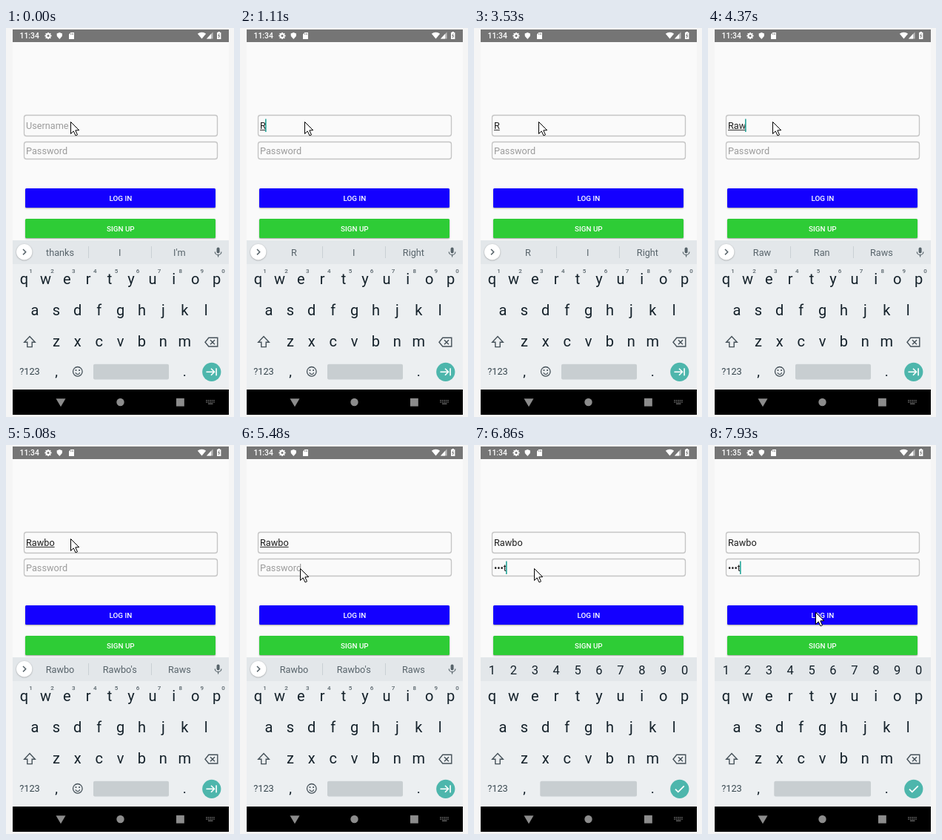
These frames come from a looping animation (308 by 524 pixels, 8 s). An HTML page with a canvas:

```html
<!DOCTYPE html>
<html lang="en">
<head>
<meta charset="utf-8">
<title>Log in</title>
<style>
html, body { margin: 0; width: 100%; height: 100%; overflow: hidden; background: #f5f5f5; }
canvas { display: block; width: 308px; height: 524px; }
</style>
</head>
<body>
<canvas id="stage"></canvas>
<script>
const LOOP = 8000, W = 308, H = 524, TAU = Math.PI * 2;
const canvas = document.getElementById('stage');
const c = canvas.getContext('2d');
const dpr = window.devicePixelRatio || 1;
canvas.width = W * dpr;
canvas.height = H * dpr;

const INK = '#14212a', SOFT = '#58646b', ICON = '#455159', TEAL = '#4db6ac';
const BAR = '#757575', NAV = '#8c8c8c', WHITE = '#fff';
const DIGITS = '1234567890', KEY_W = 28.9;

const NAME = 'Rawbo', SECRET = 'test';
const nameKeys = [1110, 3940, 4370, 4520, 4520];
const secretKeys = [6460, 6460, 6710, 6860];
const FIRST_BLINK = 130, FOCUS = 5600, KEYS_SWAP = 5750, MINUTE = 7260;
const BLINK = 484;
const caretResets = [FIRST_BLINK, ...nameKeys, FOCUS, ...secretKeys];

// Suggestions beside the typed word, by its length
const sideWords = ['I I\'m', 'I Right', 'Ran Rare', 'Ran Raws', '', NAME + '\'s Raws'];

const typed = (keys, t) => keys.filter(k => t >= k).length;

function caretOn(t) {
  const last = caretResets.filter(k => t >= k).pop();
  return last !== undefined && Math.floor((t - last) / BLINK) % 2 === 0;
}

// Three eased jumps, 130 ms apart
function glide(t, start) {
  const step = Math.floor((t - start) / 130) + 1;
  return Math.sin(Math.min(3, Math.max(0, step)) / 3 * Math.PI / 2);
}

function mousePos(t) {
  const a = glide(t, 5200), b = glide(t, 7540);
  return [87 - 6 * a + 64 * b, 126 + 40 * a + 59 * b].map(Math.round);
}

function rect(x, y, w, h, color) {
  c.fillStyle = color;
  c.fillRect(x, y, w, h);
}

function fill(color) {
  c.fillStyle = color;
  c.fill();
}

function stroke(color, width) {
  c.strokeStyle = color;
  c.lineWidth = width;
  c.stroke();
}

function round(x, y, w, h, r) {
  c.beginPath();
  c.moveTo(x + r, y);
  c.arcTo(x + w, y, x + w, y + h, r);
  c.arcTo(x + w, y + h, x, y + h, r);
  c.arcTo(x, y + h, x, y, r);
  c.arcTo(x, y, x + w, y, r);
  c.closePath();
}

function arc(x, y, r, from = 0, to = TAU) {
  c.beginPath();
  c.arc(x, y, r, from, to);
}

function disc(x, y, r, color) {
  arc(x, y, r);
  fill(color);
}

function path(points, close) {
  c.beginPath();
  points.forEach(([x, y], i) => i ? c.lineTo(x, y) : c.moveTo(x, y));
  if (close) c.closePath();
}

function poly(points, color) {
  path(points, true);
  fill(color);
}

function line(points, color, width, close) {
  path(points, close);
  stroke(color, width);
}

// Symmetric outline around x from its right half
function mirror(x, y, half) {
  const right = half.map(([dx, dy]) => [x + dx, y + dy]);
  const left = half.map(([dx, dy]) => [x - dx, y + dy]).reverse();
  return [...right, ...left];
}

// Arrow head pointing right
function chevron(x, y, r, color, width) {
  line([[x - r, y - r], [x, y], [x - r, y + r]], color, width);
}

function text(s, x, y, size, color, align = 'center', weight = 400) {
  c.font = `${weight} ${size}px Roboto, "Noto Sans", sans-serif`;
  c.textAlign = align;
  c.fillStyle = color;
  c.fillText(s, x, y);
}

function withShadow(blur, dy, draw) {
  c.save();
  c.shadowColor = 'rgba(0,0,0,.35)';
  c.shadowBlur = blur * dpr;
  c.shadowOffsetY = dy * dpr;
  draw();
  c.restore();
}

function statusBar(t) {
  rect(9, 2, 292, 17, BAR);
  text(t < MINUTE ? '11:34' : '11:35', 18.5, 14.2, 10.4, WHITE, 'left', 500);

  // gear
  for (let a = 0; a < Math.PI; a += Math.PI / 4) {
    const dx = Math.cos(a) * 4.6, dy = Math.sin(a) * 4.6;
    line([[57 - dx, 10.5 - dy], [57 + dx, 10.5 + dy]], WHITE, 1.7);
  }
  disc(57, 10.5, 3.5, WHITE);
  disc(57, 10.5, 1.5, BAR);

  // shield and memory card
  poly(mirror(72.3, 6, [[0, 0], [3.7, 1.5], [3.5, 5], [0, 9]]), WHITE);
  poly([[87.5, 6], [92, 6], [92, 15], [85, 15], [85, 8.5]], WHITE);
  for (let i = 0; i < 3; i++) rect(87.3 + i * 1.5, 7.2, .7, 1.9, BAR);

  // wifi, signal and battery
  c.beginPath();
  c.moveTo(264.5, 14.5);
  c.arc(264.5, 14.5, 8.8, -2.27, -.87);
  fill(WHITE);
  poly([[279.5, 5.5], [279.5, 14.5], [271, 14.5]], '#bdbdbd');
  poly([[277, 8], [277, 14.5], [271, 14.5]], WHITE);
  rect(286.5, 5, 2.4, 1.2, WHITE);
  rect(285, 6, 5.4, 9, WHITE);
  line([[288.2, 7.6], [286.8, 10.5], [288.6, 10.5], [287.2, 13.4]], BAR, 1);
}

function field(y, h) {
  round(24.5, y, 261, h, 3);
  fill('#fafafa');
  stroke('#c4c4c4', 1.3);
}

function entry(value, hint, base, caret, underline) {
  text(value || hint, 27, base, 12.7, value ? '#1c1c1c' : '#9b9b9b', 'left');
  const w = value ? c.measureText(value).width : 0;
  if (underline) rect(27, base + 1, w, 1, '#333');
  if (caret) rect(Math.max(27, Math.floor(26.5 + w)), base - 13.5, 1.6, 17.5, '#26a69a');
}

function button(label, y, color) {
  withShadow(2, 1, () => {
    round(26, y, 257, 26, 1.5);
    fill(color);
  });
  text(label, 154.8, y + 17.3, 9.9, WHITE, 'center', 500);
}

function suggestions(words) {
  withShadow(2, .6, () => disc(24.7, 301.7, 10.7, WHITE));
  chevron(26.7, 301.7, 3.7, SOFT, 1.5);
  for (const x of [111, 196]) rect(x, 294, 1, 16, '#c9d0d4');
  words.forEach((w, i) => text(w, 73 + i * 80.7, 307, 12.7, SOFT));

  // microphone
  round(284.6, 295.6, 4, 8, 2);
  fill(SOFT);
  arc(286.6, 301.4, 4.3, 0, Math.PI);
  stroke(SOFT, 1.2);
  rect(286, 305.5, 1.2, 3, SOFT);
}

function keyRow(keys, x, base, size, color = INK, weight = 400) {
  [...keys].forEach((k, i) => text(k, x + i * KEY_W, base, size, color, 'center', weight));
}

function smiley(x, y) {
  arc(x, y, 6.3);
  stroke(ICON, 1.3);
  for (const side of [-1, 1]) disc(x + side * 2.3, y - 1.8, 1.1, ICON);
  arc(x, y + .8, 2.9, .2, Math.PI - .2);
  stroke(ICON, 1.2);
}

function keyboard(t) {
  const secret = t >= KEYS_SWAP, n = typed(nameKeys, t);
  rect(9, 286, 292, 201, '#eceff1');
  rect(9, 286, 292, 32, '#e3e7ea');

  if (secret) keyRow(DIGITS, 24.5, 308.6, 16.5);
  else {
    suggestions([NAME.slice(0, n) || 'thanks', ...sideWords[n].split(' ')]);
    keyRow(DIGITS, 33.5, 330.3, 8, SOFT, 500);
  }
  ['qwertyuiop', 'asdfghjkl', 'zxcvbnm'].forEach((row, i) =>
    keyRow(row, 24.5 + [0, .5, 1.5][i] * KEY_W, 345 + i * 41.8, 20));

  // shift and backspace
  line(mirror(32, 415.5, [[0, 0], [7.3, 7.8], [3.2, 7.8], [3.2, 14.1]]), ICON, 1.4, true);
  line([[273.8, 417.3], [285.8, 417.3], [285.8, 429], [273.8, 429], [269, 423.2]], ICON, 1.4, true);
  for (const d of [-3, 3]) line([[279 - d, 420.2], [279 + d, 426.2]], ICON, 1.4);

  text('?123', 32, 467.4, 12.8, '#37464e');
  text(',', 68, 468.5, 19, INK);
  text('.', 241.3, 468.5, 19, INK);
  if (!secret) smiley(96.8, 462.8);
  const left = secret ? 89.3 : 118;
  round(left, 452.8, 220 - left, 20.6, 2);
  fill('#c8ced1');

  disc(277.8, 463.3, 12.6, TEAL);
  if (secret) line([[272, 463.6], [275.8, 467.4], [283.8, 459.3]], WHITE, 1.7);
  else {
    rect(270.5, 462.5, 10.5, 1.6, WHITE);
    chevron(281.5, 463.3, 4.5, WHITE, 1.6);
    rect(283.3, 458.3, 1.6, 10, WHITE);
  }
}

function navBar() {
  rect(9, 487, 292, 34, '#000');
  poly([[67.5, 499.3], [80.5, 499.3], [74, 510.2]], NAV);
  disc(154.5, 504, 5.2, NAV);
  rect(230, 498.8, 10.8, 10.8, NAV);
  for (let i = 0; i < 10; i++)
    rect(270.2 + i % 5 * 2.5, 501 + Math.floor(i / 5) * 2.3, 1.5, 1.3, '#777');
  rect(273, 505.6, 6.5, 1.2, '#777');
}

function mouse([x, y]) {
  c.save();
  c.translate(x + .5, y + .5);
  const shape = [[0, 0], [0, 16], [3.7, 12.4], [6.5, 18.4], [9, 17.3], [6.3, 11.4], [11.2, 11.2]];
  poly(shape, WHITE);
  line(shape, '#000', 1, true);
  c.restore();
}

function draw(t) {
  const user = NAME.slice(0, typed(nameKeys, t));
  const n = typed(secretKeys, t);
  const pass = n ? '•'.repeat(n - 1) + SECRET[n - 1] : '';
  const caret = caretOn(t), onPass = t >= FOCUS;

  c.setTransform(dpr, 0, 0, dpr, 0, 0);
  rect(0, 0, W, H, '#f5f5f5');
  rect(9, 19, 292, 267, '#fafafa');
  statusBar(t);
  field(117.5, 28);
  field(153.5, 23);
  entry(user, 'Username', 136, caret && !onPass, !onPass);
  entry(pass, 'Password', 170, caret && onPass, false);
  button('LOG IN', 216, '#1400ff');
  button('SIGN UP', 257, '#2ecc36');
  keyboard(t);
  navBar();
  mouse(mousePos(t));
}

const begin = performance.now();
function tick() {
  draw((performance.now() - begin) % LOOP);
  requestAnimationFrame(tick);
}
tick();
</script>
</body>
</html>
```
